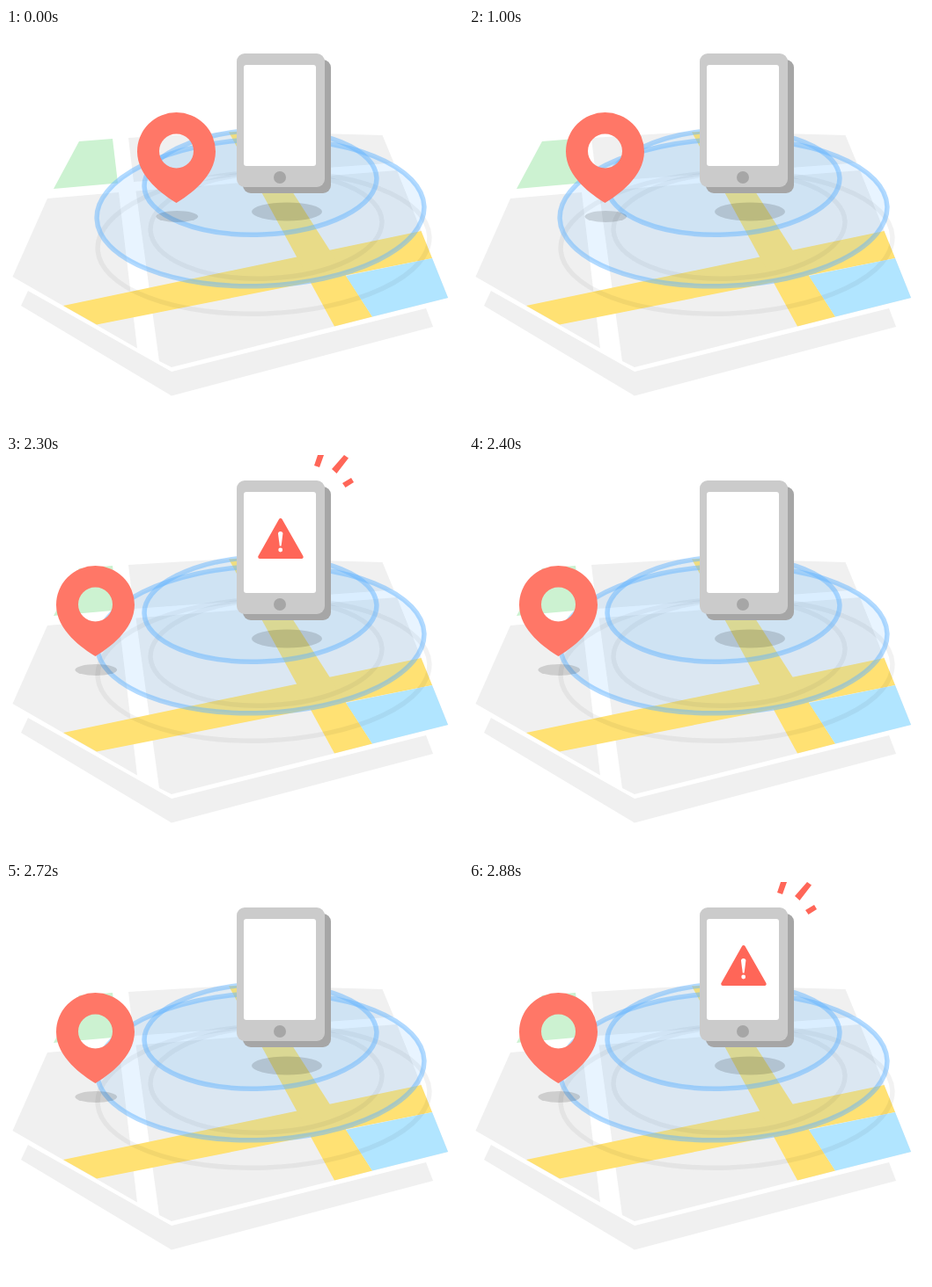
Animation, 519 px wide and 454 px high, one loop 4880 ms. Source, as an HTML page:

```html
<!DOCTYPE html>
<html lang="en">
<head>
<meta charset="utf-8">
<title>Device leaves its zone</title>
<style>
  html, body { margin: 0; width: 100%; height: 100%; overflow: hidden; background: #fff; }
  svg { display: block; width: 100vw; height: 100vh; }
</style>
</head>
<body>
<svg viewBox="0 0 519 454">
  <!-- map -->
  <g fill="#f0f0f0">
    <path d="M25 299L188 391L477 319L485 340L188 418.5L17 316Z"/>
    <path d="M47 194L128 187L149 364.5L7.500 283Z"/>
    <path d="M139 125L265 117.500L427.500 122L440.500 153.500L145 175Z"/>
    <path d="M147.500 185.500L444 162L502 307L188 386L174 379Z"/>
  </g>
  <path fill="#ccf2d1" d="M83 129L121 126L127 176.500L54 183Z"/>
  <g fill="#ffe173">
    <path d="M65 316L471.500 231L484 262L103 337.500Z"/>
    <path d="M253 118.500L281 117L416 328.500L373 339.500Z"/>
  </g>
  <path fill="#b1e5ff" d="M386 282L484 262L502 307L416 328.500Z"/>

  <!-- zone rings and their shadows -->
  <g fill="none" stroke="#000" stroke-opacity=".05" stroke-width="5.500">
    <ellipse rx="188.500" ry="80.500" transform="translate(292.500 244.500) rotate(-2.200)"/>
    <ellipse rx="131.500" ry="60" transform="translate(295.500 225) rotate(-2.200)"/>
  </g>
  <g fill="#66b5ff" fill-opacity=".15" stroke="#66b5ff" stroke-opacity=".5" stroke-width="5.500">
    <ellipse rx="186" ry="83.500" transform="translate(289 210) rotate(-2.200)"/>
    <ellipse rx="132" ry="59.500" fill-opacity=".1" transform="translate(289 175.500) rotate(-2.200)"/>
  </g>

  <!-- phone -->
  <ellipse cx="319" cy="209" rx="40" ry="10.500" fill-opacity=".14"/>
  <rect x="269" y="36" width="100" height="152" rx="9" fill="#a6a6a6"/>
  <rect x="262" y="29" width="100" height="152" rx="9" fill="#cbcbcb"/>
  <rect x="270" y="42" width="82" height="115" rx="3" fill="#fff"/>
  <circle cx="311" cy="170" r="7" fill="#a6a6a6"/>

  <g id="alert" fill="#ff6658">
    <path stroke="#ff6658" stroke-width="4" stroke-linejoin="round" d="M311.800 74L335.700 116H288.200Z"/>
    <path fill="#fff" d="M309 89.500Q309 87 311.700 87T314.400 89.500L312.600 103.500H310.800Z"/>
    <circle cx="311.700" cy="108" r="2.400" fill="#fff"/>
    <path d="M354 0H361L356 14L350 12ZM384 0L389 3.500L375.500 21L370 16ZM382 32L392 26L395 31L385.500 37Z"/>
  </g>

  <g id="pin">
    <ellipse cx=".8" cy="74" rx="23.800" ry="6.500" fill-opacity=".14"/>
    <path fill="#ff7767" fill-rule="evenodd" d="M0 58.500C-14 50-44.500 29-44.500 0A44.500 44.500 0 0 1 44.500 0C44.500 29 14 50 0 58.500ZM-19.500-.5a19.500 19.500 0 1 0 39 0a19.500 19.500 0 1 0-39 0Z"/>
  </g>
</svg>
<script>
  const LOOP = 4880;
  const pin = document.getElementById("pin");
  const alertMark = document.getElementById("alert");

  const pinStops = [[0, 193.5, 140.5], [1000, 154.5, 140.5], [2000, 101.5, 170.5]];
  const toggles = [2300, 2400, 2560, 2720, 2880];

  function draw(t) {
    const [, x, y] = pinStops.filter(stop => t >= stop[0]).pop();
    pin.setAttribute("transform", `translate(${x} ${y})`);
    const lit = toggles.filter(at => t >= at).length % 2 === 1;
    alertMark.setAttribute("visibility", lit ? "visible" : "hidden");
  }

  const start = performance.now();
  function tick() {
    draw((performance.now() - start) % LOOP);
    requestAnimationFrame(tick);
  }
  tick();
</script>
</body>
</html>
```
